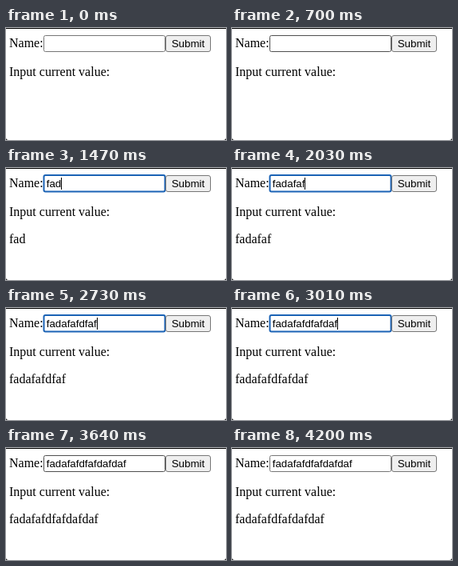
An HTML page that plays this animation: 276 by 140 pixels, repeating every 4.9 s.

```html
<!DOCTYPE html>
<html lang="en">
<head>
<meta charset="utf-8">
<style>
  html, body { margin: 0; width: 100%; height: 100%; overflow: hidden; background: #000; }
  svg { display: block; width: 276px; height: 140px; }
  .serif { font: 16px "Liberation Serif", serif; }
  .sans { font: 13.333px "Liberation Sans", sans-serif; }
</style>
</head>
<body>
<svg viewBox="0 0 276 140">
  <path d="M0 1H276V137Q276 140 273 140H3Q0 140 0 137Z" fill="#fff"/>
  <g class="serif">
    <text x="4" y="24">Name:</text>
    <text x="4" y="60">Input current value:</text>
    <text id="echo" x="4" y="94"></text>
  </g>
  <rect id="field" fill="#fff"/>
  <rect id="button" x="200.5" y="9.5" width="56" height="20" rx="2.5"/>
  <g class="sans">
    <text id="typed" x="50.7" y="24"></text>
    <text x="207.7" y="24">Submit</text>
  </g>
  <rect id="caret" y="12" width="1" height="15"/>
</svg>
<script>
const LOOP = 4900;
const TEXT = "fadafafdfafdafdaf";
const KEY_TIMES = [1190, 1330, 1470, 1610, 1750, 1960, 2030, 2240, 2450,
  2520, 2730, 2800, 2870, 3010, 3080, 3150, 3290];
const [echo, field, button, typed, caret] =
  ["echo", "field", "button", "typed", "caret"].map(id => document.getElementById(id));

const set = (el, attrs) => {
  for (const name in attrs) el.setAttribute(name, attrs[name]);
};
const within = (t, from, to) => t >= from && t < to;

function draw(now) {
  const t = now % LOOP;
  const focused = within(t, 1050, 3640);
  const fieldHover = within(t, 700, 4060);
  const buttonHover = within(t, 4060, 4200);

  const value = TEXT.slice(0, KEY_TIMES.filter(k => k <= t).length);
  echo.textContent = typed.textContent = value;

  set(field, focused
    ? { x: 47.5, y: 9, width: 152, height: 20.5, rx: 2, stroke: "#1b63b5", "stroke-width": 2 }
    : { x: 47.5, y: 9.5, width: 152, height: 20, rx: 2,
        stroke: fieldHover ? "#4f4f4f" : "#767676", "stroke-width": 1 });
  set(button, {
    fill: buttonHover ? "#e5e5e5" : "#efefef",
    stroke: buttonHover ? "#4f4f4f" : "#767676"
  });
  set(caret, {
    x: Math.round(50.7 + (value ? typed.getComputedTextLength() : 0)),
    visibility: focused ? "visible" : "hidden"
  });
  requestAnimationFrame(() => draw(performance.now()));
}
draw(performance.now());
</script>
</body>
</html>
```
